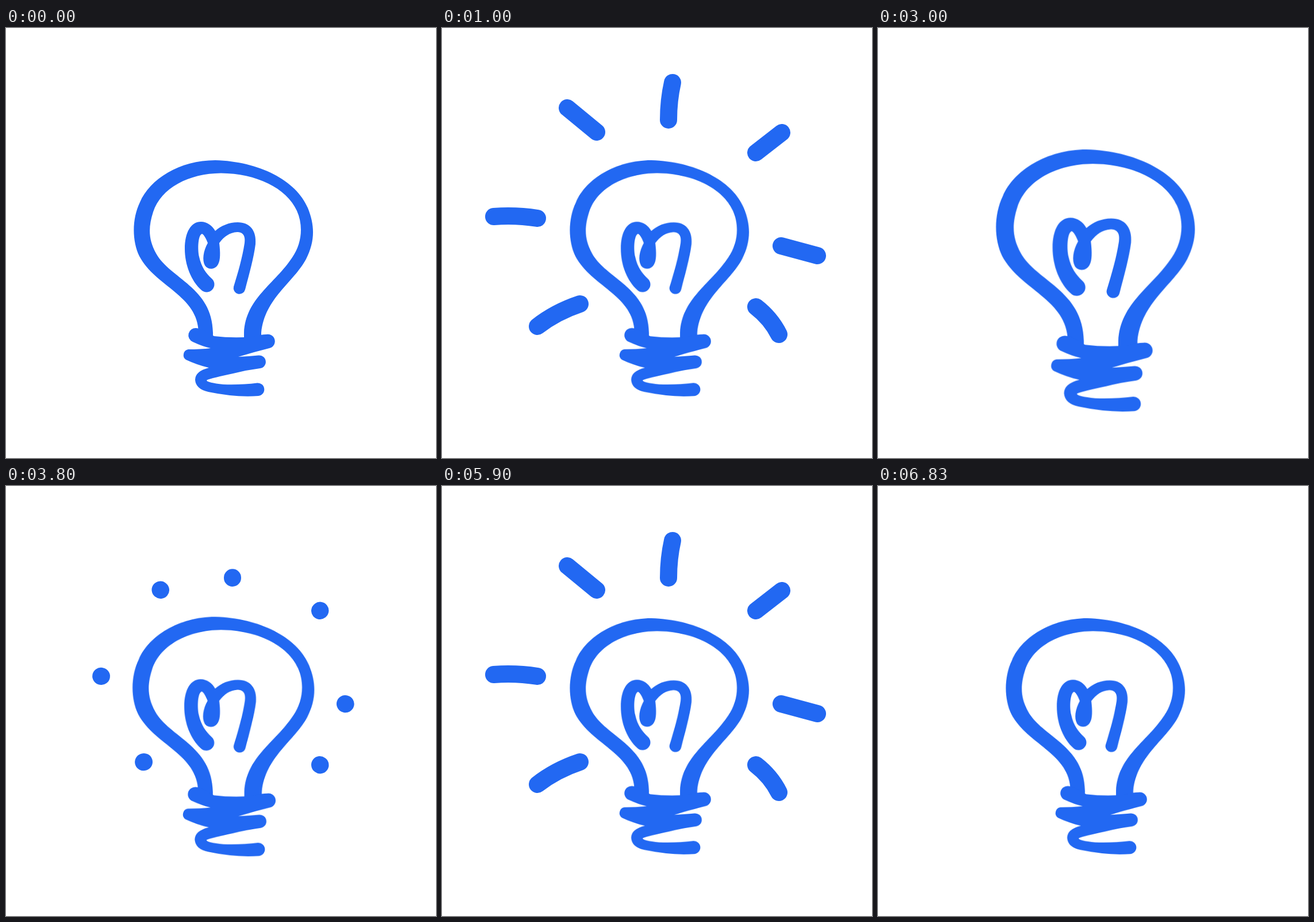
Animation, 748 px wide and 748 px high, one loop 7010 ms. Source, as an HTML page without scripts:

```html
<!DOCTYPE html>
<html lang="en">
<head>
<meta charset="utf-8">
<title>Light bulb</title>
<style>
  html, body { margin: 0; width: 100%; height: 100%; overflow: hidden; background: #fff; }
  svg { display: block; width: 100%; height: 100%; }

  .bulb {
    fill: #2268f2;
    transform-origin: 378px 400px;
    animation: pulse 3505ms ease-in-out infinite;
  }
  .rays path {
    fill: none;
    stroke: #2268f2;
    stroke-width: 30;
    stroke-linecap: round;
    stroke-dasharray: 1 3;
    animation: shine 3505ms ease-in-out infinite;
  }

  /* one swell as the rays come out, one as they go back */
  @keyframes pulse {
    0%, 5.7%, 27.7%, 72.8%, 95%, 100% { transform: scale(1); }
    16.8%, 84% { transform: scale(1.115); }
  }
  @keyframes shine {
    0%, 7.12% { opacity: 0; stroke-dashoffset: .99; }
    7.13%, 8.3% { opacity: 1; stroke-dashoffset: .99; }
    17.7%, 68.5% { opacity: 1; stroke-dashoffset: 0; }
    80% { opacity: 1; stroke-dashoffset: .99; }
    80.01%, 100% { opacity: 0; stroke-dashoffset: .99; }
  }
</style>
</head>
<body>
<svg viewBox="0 0 748 748">
  <!-- each ray runs from its inner end outwards -->
  <g class="rays">
    <path pathLength="1" d="M166 331Q128 325 90 328"/>
    <path pathLength="1" d="M269 181L218 139"/>
    <path pathLength="1" d="M394 160Q394 126 401 95"/>
    <path pathLength="1" d="M546 217L591 182"/>
    <path pathLength="1" d="M590 379L653 396"/>
    <path pathLength="1" d="M546 485Q572 505 586 533"/>
    <path pathLength="1" d="M240 480Q198 494 166 519"/>
  </g>
  <g class="bulb">
    <!-- glass -->
    <path d="M335 542V530C334 465 260 450 232 397C219 370 219 332 233 303
      C250 263 302 230 364 230C440 232 505 265 525 313C538 345 537 372 522 402
      C500 443 450 470 444 530V542H414V530C417 470 467 446 498 399
      C514 376 518 345 506 318C488 278 435 253 374 252.5C318 253 270 278 256 320
      C247 348 248 368 261 392C285 436 359 451 360 530V542Z"/>
    <!-- filament -->
    <path d="M340 456C322 440 311 412 311 384C311 355 322 337 339 337
      C350 337 359 344 364 353C374 344 388 338 403 338C424 338 436 352 434 376
      C431 400 423 428 416 455A10 10 0 0 1 396 450C404 424 411 400 415 374
      C417 360 411 355 402 355C389 356 380 362 371 374C373 391 373 404 369 411
      C364 421 351 421 346 413C341 404 343 388 351 374C348 366 344 359 341 358
      C334 360 333 385 336 398C340 416 348 427 358 436A13 13 0 0 1 340 456Z"/>
    <!-- screw base -->
    <path d="M331 522C342 523 352 531 362 536Q395 540 430 537Q444 533 453 533
      A12 12 0 0 1 458 557Q430 564 404 572Q422 571 439 569.5A11 11 0 0 1 442 592
      Q418 595 395 601Q348 611 349 613Q350 617 378 620Q410 621 437 617.5
      A11 11 0 0 1 439 640Q400 643 352 633Q330 628 329 612Q329 597 353 591
      Q332 586 313 577A10 10 0 0 1 317 559Q338 559 356 557Q342 554 325 546
      A12.5 12.5 0 0 1 331 522Z"/>
  </g>
</svg>
</body>
</html>
```
